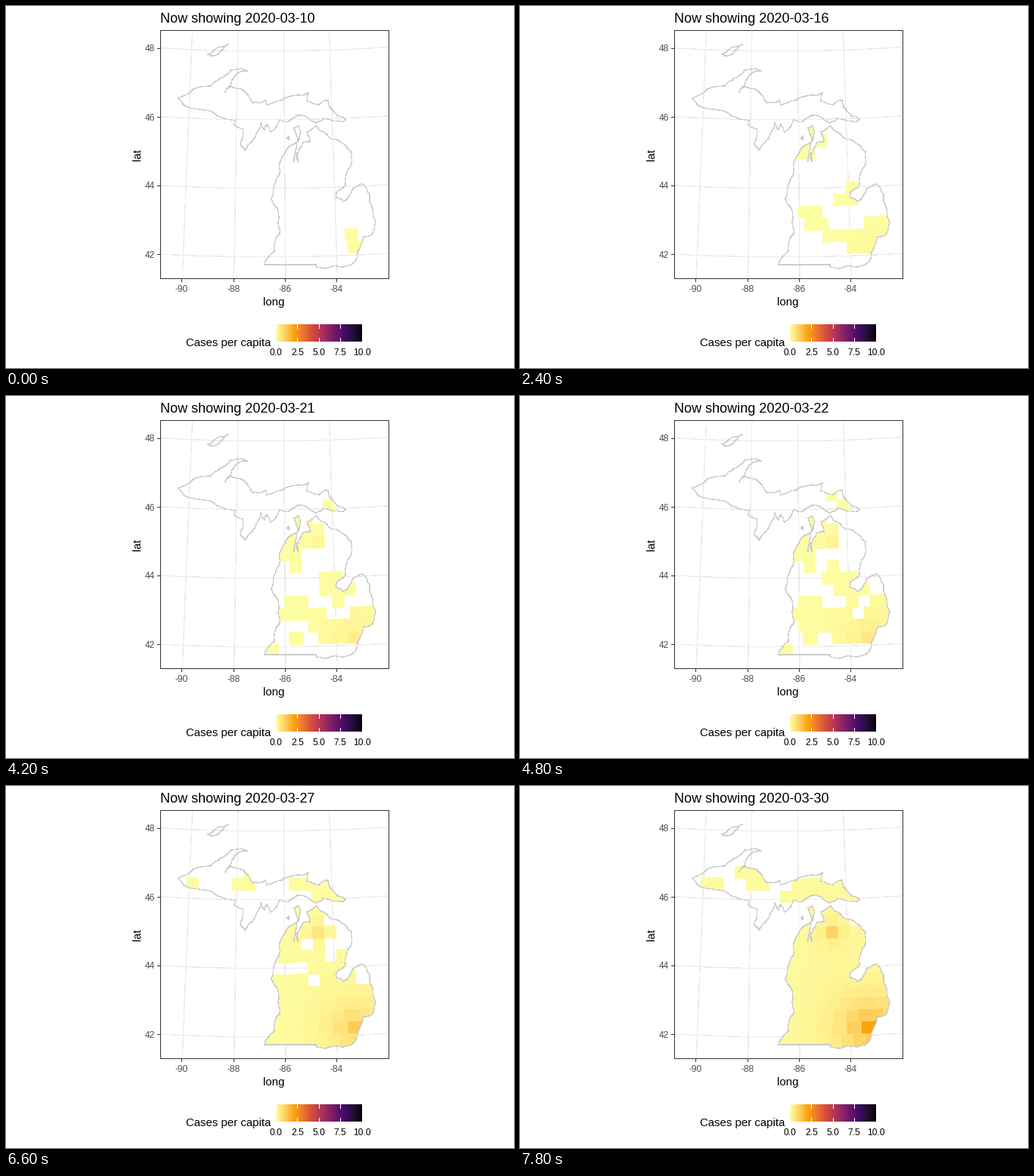
A matplotlib script that plays this animation: 672x480 px, repeating every 8 s.

```python
import numpy as np
import matplotlib
import matplotlib.pyplot as plt
from matplotlib.animation import FuncAnimation
from matplotlib.colors import to_rgb
from matplotlib.patches import PathPatch, Polygon, Rectangle
from matplotlib.path import Path

matplotlib.rcParams["font.family"] = "Liberation Sans"
W, H, DPI = 672, 480, 96
FRAMES, STEP = 40, 200
DAYS_PER_FRAME = 53 / 99
LAST_DAY = 21
PX = 72 / DPI
HAIR = .3 * PX
LEFT, TOP, RIGHT, BOTTOM = 204, 32, 506, 361

# ---- colour scale, blended in Lab ----
TO_XYZ = np.array([[.4124, .3576, .1805], [.2126, .7152, .0722], [.0193, .1192, .9505]])
WHITE = TO_XYZ.sum(axis=1)
MIX = np.array([[0, 116, 0], [500, -500, 0], [0, 200, -200]])
STOPS = ["#FCFFA4", "#FCA50A", "#DD513A", "#932667", "#420A68", "#000004"]


def rgb_to_lab(rgb):
    rgb = np.asarray(rgb)
    lin = np.where(rgb > .04045, ((rgb + .055) / 1.055) ** 2.4, rgb / 12.92)
    t = TO_XYZ @ lin / WHITE
    f = np.where(t > .008856, np.cbrt(t), 7.787 * t + 16 / 116)
    return MIX @ f - [16, 0, 0]


def lab_to_rgb(lab):
    f = np.linalg.solve(MIX, lab + np.array([16, 0, 0]))
    t = np.where(f > .2069, f ** 3, (f - 16 / 116) / 7.787)
    lin = np.clip(np.linalg.solve(TO_XYZ, t * WHITE), 0, 1)
    rgb = np.where(lin > .0031308, 1.055 * lin ** (1 / 2.4) - .055, 12.92 * lin)
    return np.clip(rgb, 0, 1)


LABS = np.array([rgb_to_lab(to_rgb(c)) for c in STOPS])


def shade(value):
    pos = np.clip(value / 2, 0, 5)
    return lab_to_rgb(np.array([np.interp(pos, range(6), LABS[:, k]) for k in range(3)]))


def project(lon, lat):
    """Conic projection from degrees to stage pixels."""
    rho = 45.5 * (102.3 - np.asarray(lat, float))
    theta = np.radians(.707 * (np.asarray(lon, float) + 86.7))
    return np.column_stack([346.1 + rho * np.sin(theta), -2410.9 + rho * np.cos(theta)])


# ---- coast: a few key points in pixels, roughened between them ----
ISLE = [(294, 51), (283, 54), (267, 64), (270, 66), (282, 63)]
BEAVER = [(381, 162), (387, 159), (388, 176), (386, 180), (384, 170)]
FOX = [(372, 175), (374, 173), (374, 177)]
UPPER = [
    (228, 122), (248, 110), (271, 106), (283, 96), (297, 85), (312, 83), (319, 86),
    (308, 88), (299, 98), (290, 114), (296, 106), (313, 111), (326, 128), (343, 125),
    (345, 131), (365, 125), (372, 121), (400, 115), (398, 126), (414, 131), (426, 125),
    (428, 134), (439, 146), (449, 150), (446, 153), (431, 152), (420, 149), (410, 155),
    (385, 145), (374, 153), (362, 151), (350, 167), (345, 157), (342, 164), (337, 155),
    (325, 180), (316, 191), (310, 183), (313, 163), (302, 158), (303, 152), (280, 146),
    (262, 138), (236, 132)]
LOWER = [
    (342, 343), (355, 325), (362, 302), (361, 282), (351, 256), (358, 229), (362, 208),
    (369, 195), (384, 181), (381, 206), (384, 195), (386, 206), (388, 190), (393, 181),
    (402, 180), (398, 167), (411, 159), (424, 170), (441, 179), (457, 193), (456, 212),
    (449, 237), (437, 247), (437, 254), (446, 259), (459, 242), (471, 236), (481, 250),
    (489, 287), (484, 303), (473, 306), (468, 321), (457, 343), (411, 346), (410, 343)]
rng = np.random.default_rng(4)


def rough(ring, passes=2):
    pts = np.array(ring, float)
    for _ in range(passes):
        step = np.roll(pts, -1, axis=0) - pts
        normal = step[:, ::-1] * [1, -1]
        # long straight runs, such as the southern border, stay straight
        wobble = rng.uniform(-.13, .13, len(pts)) * (np.hypot(*step.T) < 28)
        mid = pts + step / 2 + normal * wobble[:, None]
        pts = np.stack([pts, mid], axis=1).reshape(-1, 2)
    return np.vstack([pts, pts[:1]])


land = Path.make_compound_path(
    *[Path(rough(ring), closed=True) for ring in (ISLE, BEAVER, FOX, UPPER, LOWER)])

# ---- spread of cases: first places (lon, lat, day) and a slow northward front ----
OUTBREAKS = np.array([
    (-83.4, 42.4, -3), (-82.7, 42.8, -.5), (-84.5, 42.6, 2.5), (-85.55, 43.1, -.5),
    (-84.0, 43.7, 2), (-85.82, 45.1, 1), (-85.1, 45.38, 2.8), (-85.6, 45.5, 2),
    (-84.6, 45.03, 8), (-85.55, 42.4, 9), (-85.9, 43.4, 10), (-86.5, 41.9, 11),
    (-84.7, 44.15, 10), (-85.6, 44.5, 9.5), (-83.6, 44.34, 14), (-84.8, 46.4, 12),
    (-84.1, 46.1, 11), (-85.6, 46.4, 14), (-87.6, 46.5, 13.5), (-89.8, 46.4, 15),
    (-88.6, 46.9, 18), (-86.3, 46.2, 18)])


def distance(lon, lat, to_lon, to_lat):
    return np.hypot(.72 * (lon - to_lon), lat - to_lat)


def first_day(lon, lat):
    away = distance(lon, lat, OUTBREAKS[:, 0], OUTBREAKS[:, 1])
    return min((OUTBREAKS[:, 2] + 50 * away ** 2).min(), 15 + 1.8 * (lat - 42))


def final_level(lon, lat):
    south = 2 * np.exp(-distance(lon, lat, -83.25, 42.25) / .6)
    north = .9 * np.exp(-distance(lon, lat, -84.6, 45.03) / .25)
    return .1 + south + north


def counties():
    """Rows of survey blocks; the column edge shifts from row to row."""
    for r in range(17):
        south = 41.72 + .349 * r
        width = .58 if r == 1 else .478
        edge = -83.55 if r == 1 else -85.56 if r in (2, 4, 5, 6) else -85.8
        for lon in edge + width * np.arange(-11, 8):
            yield lon, lon + width, south - .1 * (r == 0), south + .349


# ---- stage ----
fig = plt.figure(figsize=(W / DPI, H / DPI), dpi=DPI, facecolor="white")
ax = fig.add_axes([0, 0, 1, 1])


def line(xs, ys, color, z, lw=PX):
    return ax.plot(xs, ys, color=color, lw=lw, zorder=z, antialiased=False)[0]


def label(x, y, text, px, color="black", va="baseline", **kw):
    return ax.text(x, y, text, fontsize=px * PX, color=color, va=va, **kw)


panel = Rectangle((LEFT, TOP), RIGHT - LEFT, BOTTOM - TOP, fc="none", ec="#333333",
                  lw=PX, zorder=6, antialiased=False)
ax.add_patch(panel)

for lon in range(-90, -83, 2):
    pts = project(lon, np.linspace(41, 49, 60))
    line(*pts.T, "#EBEBEB", 1, HAIR).set_clip_path(panel)
    x = round(np.interp(BOTTOM, pts[::-1, 1], pts[::-1, 0])) - 1
    line([x, x], [BOTTOM, BOTTOM + 4], "#333333", 5)
    label(x, 379, str(lon), 12, "#4D4D4D", ha="center")
for lat in range(42, 49, 2):
    pts = project(np.linspace(-92, -81, 90), lat)
    line(*pts.T, "#EBEBEB", 1, HAIR).set_clip_path(panel)
    y = round(np.interp(LEFT, pts[:, 0], pts[:, 1]))
    line([LEFT - 4, LEFT], [y, y], "#333333", 5)
    label(197, y + 4.5, str(lat), 12, "#4D4D4D", ha="right")

label(354.5, 397, "long", 15, ha="center")
label(181, 197, "lat", 15, va="center", ha="right", rotation=90)
title = label(204, 22, "", 18)

blocks = []
for west, east, south, north in counties():
    spot = (west + east) / 2, (south + north) / 2
    day = first_day(*spot)
    if day > LAST_DAY:
        continue
    ring = project([west, east, east, west], [south, south, north, north])
    patch = Polygon(ring, closed=True, lw=0, ec="none", zorder=2, antialiased=False)
    ax.add_patch(patch)
    patch.set_clip_path(land, ax.transData)
    blocks.append((patch, round(day / DAYS_PER_FRAME), final_level(*spot)))
ax.add_patch(PathPatch(land, fc="none", ec="#CCCCCC", lw=HAIR, zorder=4, antialiased=False))

# ---- legend ----
label(238, 450.5, "Cases per capita", 15)
ramp = np.array([shade(v) for v in np.linspace(0, 10, 114)])[None]
ax.imshow(ramp, extent=(357, 471, 445, 422), aspect="auto", interpolation="nearest", zorder=3)
for k in range(5):
    x = 357 + 28.4 * k
    for y in (422, 440.4):
        line([x, x], [y, y + 4.6], "white", 5)
    label(x, 463, f"{2.5 * k:.1f}", 12, ha="center")

ax.set_xlim(0, W)
ax.set_ylim(H, 0)
ax.axis("off")


def draw(i):
    day = i * DAYS_PER_FRAME
    title.set_text(f"Now showing 2020-03-{10 + int(day)}")
    growth = 2 ** ((day - LAST_DAY) / 4)
    for patch, start, level in blocks:
        patch.set_visible(i >= start)
        patch.set_facecolor(shade(level * growth))
    return [title]


anim = FuncAnimation(fig, draw, frames=FRAMES, interval=STEP, init_func=lambda: draw(0),
                     repeat=True, repeat_delay=0, blit=False)
plt.show()
```
